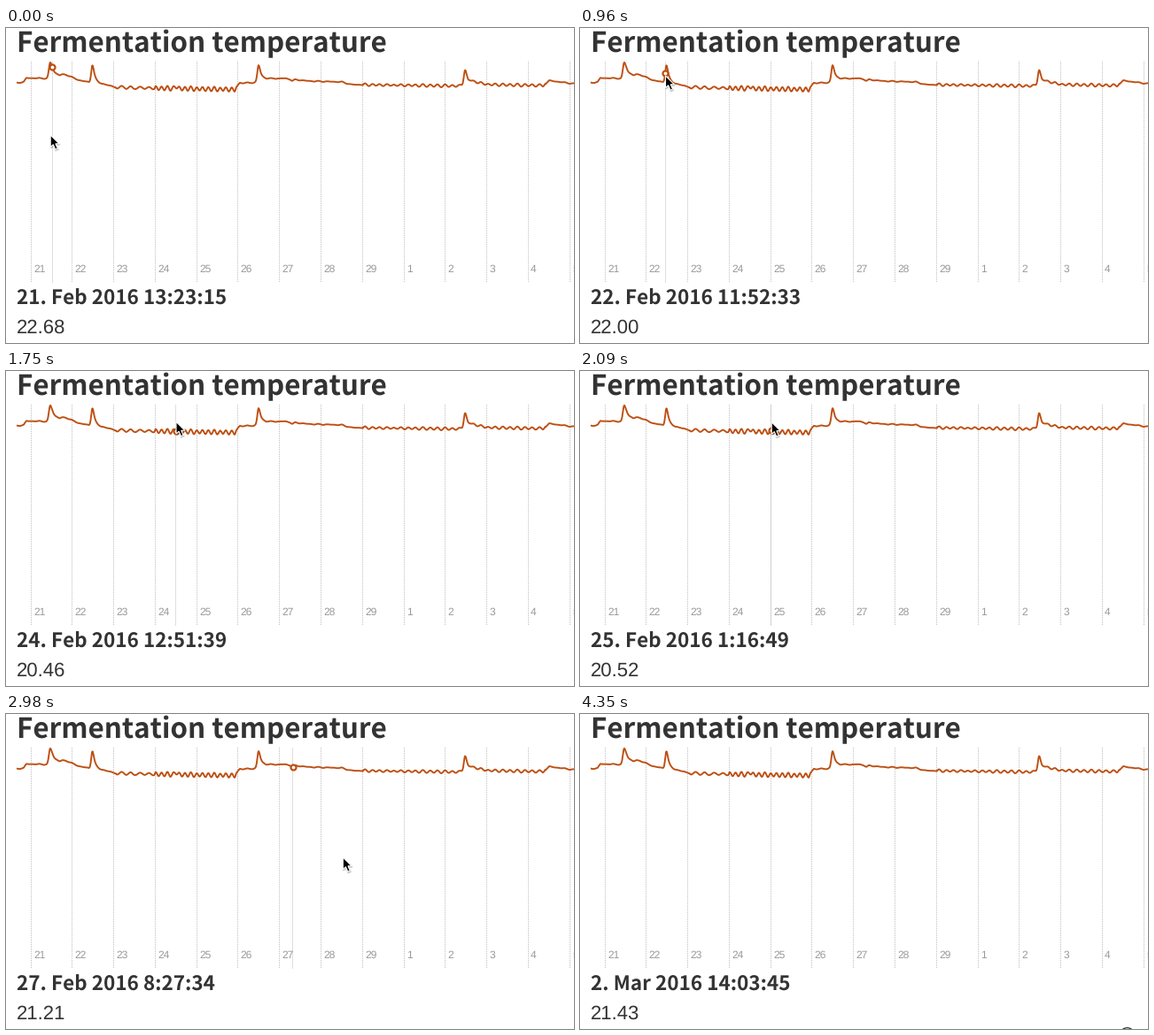
Recreate the animation shown at these times as a matplotlib script. Size 641 px wide and 356 px high, loop 4.45 s.

```python
import numpy as np
import matplotlib.pyplot as plt
from matplotlib.animation import FuncAnimation
from matplotlib.collections import LineCollection
from matplotlib.patches import Ellipse, Polygon

W, H, DPI = 641, 356, 100
PX = 72 / DPI                      # points per pixel
LOOP, INTERVAL = 4450, 25
TOP, BOTTOM = 38, 288              # chart area
DAY0, X0, DAY_W = 21, 28.05, 46.78
RUST, INK, GREY = "#bd4f12", "#333333", "#999999"

plt.rcParams["text.hinting"] = "none"


def day(d, h, m, s):
    return d + (h * 3600 + m * 60 + s) / 86400


def day_x(d):
    # the grid is in UTC, the readings are one hour ahead
    return X0 + DAY_W * (d - DAY0 - 1 / 24)


def value_y(v):
    return 44 + (22.68 - v) * 10.67


def y_value(y):
    return 22.68 - (y - 44) / 10.67


# Readings that the pointer visits: step, day, value
READINGS = [
    (5, day(21, 13, 23, 15), 22.68),
    (6, day(21, 17, 38, 30), 21.80),
    (13, day(23, 12, 11, 17), 20.43),
    (18, day(24, 12, 51, 39), 20.46),
    (22, day(25, 1, 16, 49), 20.52),
    (27, day(27, 8, 27, 34), 21.21),
    (30, day(31, 14, 3, 45), 21.43),
]

# Slow drift of the temperature: x, y
TREND = [
    (12, 62), (20, 61), (23, 56.5), (46, 57), (55, 53), (68, 53), (82, 59),
    (92, 61), (110, 64), (124, 67), (168, 68), (258, 69.5), (264, 62),
    (279, 62), (291, 58), (313, 57), (342, 60), (379, 61), (390, 64),
    (512, 65.5), (522, 60), (544, 64), (606, 65), (613, 59.5), (641, 63),
]
SPIKES = [(49.8, 15.5), (97.5, 20), (285, 18), (518, 15)]   # x, height
# start, end, first crest, period, size
RIPPLES = [(124, 168, 131, 10, 1.6), (168, 260, 169, 6.6, 2.3),
           (402, 609, 405, 8.2, 1.2)]


def shape(x):
    y = np.interp(x, *np.transpose(TREND))
    y = y - 0.6 * np.cos(x / 1.7) * np.sin(x / 9)
    for start, end, crest, period, size in RIPPLES:
        wave = size * np.cos(2 * np.pi * (x - crest) / period)
        y = y - wave * ((x > start) & (x < end))
    for peak, height in SPIKES:
        dx = x - peak
        rise = np.exp(-(dx / 1.9) ** 2)
        fall = 1 / (1 + (dx / 2.4) ** 2)
        y = y - height * np.where(dx < 0, rise, fall)
    return y


def curve(x):
    # pull the shape onto the known readings
    y = shape(x)
    for _, d, v in READINGS:
        rx = day_x(d)
        y = y + (value_y(v) - shape(rx)) * np.exp(-((x - rx) / 2) ** 2)
    return y


# The pointer moves in hard steps at these times
ticks = np.concatenate([
    np.linspace(180, 520, 5),
    np.linspace(700, 2270, 19),
    np.linspace(2810, 3590, 10),
    [4270, 4350],
])
LAST_LINE, LAST_RING, LAST_ARROW = 29, 30, 33   # last steps shown

# The pointer slows down at step 24 before it sweeps away
hover_keys = np.transpose(sorted([(n, d) for n, d, _ in READINGS]
                                 + [(24, 25.2)]))


def pointer(step, hover_x):
    lead = np.interp(step, (5, 6, 24, 27, 30, 34), (-2, 0.5, 0.5, 57, 55, 79))
    y = np.interp(step, (0, 5, 13, 24, 27, 34), (121, 51, 57, 58, 162, 362))
    return np.array([hover_x + lead, y])


def stamp(d):
    date, secs = divmod(round(d * 86400), 86400)
    month = "Feb"
    if date > 29:
        date, month = date - 29, "Mar"
    h, m, s = secs // 3600, secs // 60 % 60, secs % 60
    return f"{date}. {month} 2016 {h}:{m:02d}:{s:02d}"


fig = plt.figure(figsize=(W / DPI, H / DPI), dpi=DPI, facecolor="white")
ax = fig.add_axes([0, 0, 1, 1])
ax.set_xlim(0, W)
ax.set_ylim(H, 0)
ax.axis("off")


def label(x, y, text, px, color=INK, font="Liberation Sans", weight="normal"):
    return ax.text(x, y, text, fontsize=px * PX, color=color, family=font,
                   weight=weight, va="baseline", ha="left")


def heading(x, y, text, px):
    return label(x, y, text, px, font="Noto Sans CJK JP", weight="bold")


# Grid and day labels
grid_x = np.floor(X0 + DAY_W * np.arange(14)) + 0.5
grid = LineCollection([[(x, TOP), (x, BOTTOM)] for x in grid_x],
                      colors="#c0c0c0", linewidths=PX,
                      linestyles=[(0, (1, 1))], zorder=2)
grid.set_snap(False)
ax.add_collection(grid, autolim=False)
for i, x in enumerate(grid_x):
    date = DAY0 + i
    label(x + 2.7, 276, str(date if date < 30 else date - 29), 12, GREY)

line_x = np.arange(12, W + 1, 0.5)
ax.plot(line_x, curve(line_x), color=RUST, lw=1.9 * PX,
        solid_joinstyle="round", solid_capstyle="butt", zorder=4)

heading(12, 27, "Fermentation temperature", 31.4)
date_text = heading(12, 313, "", 22.5)
value_text = label(11.6, 345, "", 22.2)

hover, = ax.plot([0, 0], [TOP, BOTTOM], color="#dfdfdf", lw=PX, snap=False,
                 solid_capstyle="butt", zorder=1)
ring, = ax.plot([0], [0], "o", ms=6 * PX, mew=2.2 * PX, mec=RUST,
                mfc="white", zorder=5)

ARROW = np.array([(0, 0), (0, 13.6), (3.1, 10.7), (5.5, 16.2), (8, 15.1),
                  (5.7, 9.8), (9.9, 9.8)])
shadow = Polygon(ARROW, fc="black", ec="black", lw=2 * PX, alpha=0.16,
                 zorder=8)
arrow = Polygon(ARROW, fc="black", ec="white", lw=1.1 * PX, zorder=9)
peek = Ellipse((617.5, 0), 13, 9, fc="white", ec="#222222", lw=1.2 * PX,
               zorder=9)
for patch in (shadow, arrow, peek):
    ax.add_patch(patch)


def draw(i):
    now = i * INTERVAL + INTERVAL - 1
    step = int(np.searchsorted(ticks, now, side="right"))

    d = np.interp(step, *hover_keys)
    x = day_x(d)
    y = curve(x)
    hover.set_xdata([np.floor(x) + 0.5] * 2)
    hover.set_visible(step <= LAST_LINE)
    ring.set_data([x + 0.3], [y])
    ring.set_visible(step <= LAST_RING)
    date_text.set_text(stamp(d))
    value_text.set_text(f"{y_value(y):.2f}")

    tip = pointer(step, x)
    arrow.set_xy(ARROW + tip)
    shadow.set_xy(ARROW + tip + (0.5, 1.2))
    for patch in (arrow, shadow):
        patch.set_visible(step <= LAST_ARROW)

    # another pointer rises at the bottom edge in the last two steps
    peek.set_visible(step > len(ticks) - 2)
    peek.center = (617.5, 359.2 + 0.7 * (len(ticks) - step))
    return arrow, shadow, peek, hover, ring, date_text, value_text


anim = FuncAnimation(fig, draw, frames=LOOP // INTERVAL, interval=INTERVAL,
                     repeat=True, repeat_delay=0, blit=False)
plt.show()
```
